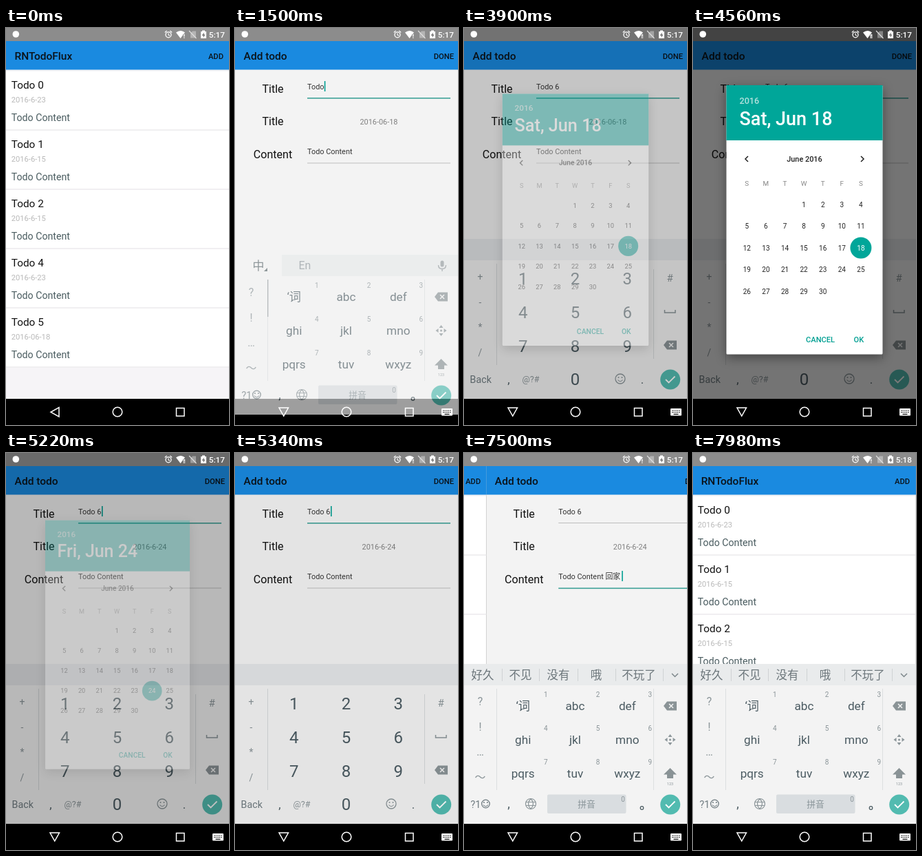
Write an HTML page that moves like this. It is 324 px wide and 576 px high and loops after 8000 ms.

```html
<!DOCTYPE html>
<html lang="en">
<head>
<meta charset="utf-8">
<title>Todo list</title>
<style>
  html, body { margin: 0; width: 324px; height: 576px; overflow: hidden; background: #000; }
  svg { display: block; font-family: Roboto, "Noto Sans CJK SC", "Noto Sans CJK", sans-serif; }
  text { white-space: pre; }
  .mid { text-anchor: middle; }
  .end { text-anchor: end; }
  .bold { font-weight: 500; }
  .line { fill: none; stroke-width: 1.5; }
</style>
</head>
<body>
<svg id="stage" width="324" height="576" viewBox="0 0 324 576"></svg>
<script>
const LOOP = 8000, STEP = 60, WIDTH = 324;
const TEAL = '#009f92', KEY = '#4b5b62', SOFT = '#8b9599', PAPER = '#f3f3f3', BLUE = '#1a8ae0';

const text = (x, y, s, size, fill, cls = '', id = '') =>
  `<text x="${x}" y="${y}" font-size="${size}" fill="${fill}" class="${cls}" id="${id}">${s}</text>`;
const mid = (x, y, s, size, fill, cls = '', id = '') => text(x, y, s, size, fill, 'mid ' + cls, id);
const rect = (x, y, w, h, fill, extra = '') =>
  `<rect x="${x}" y="${y}" width="${w}" height="${h}" fill="${fill}" ${extra}/>`;
const circle = (x, y, r, fill, extra = '') => `<circle cx="${x}" cy="${y}" r="${r}" fill="${fill}" ${extra}/>`;
const ring = (x, y, r, color, width) => circle(x, y, r, 'none', `stroke="${color}" stroke-width="${width}"`);
const path = (d, fill, extra = '') => `<path d="${d}" fill="${fill}" ${extra}/>`;
const line = (d, color, width = 1.5, extra = '') =>
  `<path d="${d}" fill="none" stroke="${color}" stroke-width="${width}" ${extra}/>`;
const group = (id, ...parts) => `<g id="${id}">${parts.join('')}</g>`;
const each = (list, fn) => list.map(fn).join('');

const header = (title, action, right) =>
  rect(0, 19, WIDTH, 41.5, BLUE) +
  text(12.6, 46, title, 15.5, '#0b1218', 'bold') +
  text(right, 45, action, 11.2, '#0b1218', 'bold end');

function listPage() {
  const rows = [['0', '2016-6-23'], ['1', '2016-6-15'], ['2', '2016-6-15'], ['4', '2016-6-23'], ['5', '2016-06-18']];
  return rect(0, 19, WIDTH, 519, '#f6f4f7') +
    rect(0, 61, WIDTH, 430, '#fff') +
    each(rows, ([n, date], i) => {
      const y = 86 * i;
      return text(7.7, y + 88.4, 'Todo ' + n, 15.4, '#111') +
        text(7.7, y + 108, date, 11.2, '#b9b9b9') +
        text(7.7, y + 135, 'Todo Content', 14.2, '#4a5c60') +
        rect(0, y + 147, WIDTH, 2, '#f0eff1');
    }) +
    rect(0, 60, WIDTH, 2.5, '#eeeff3') +
    header('RNTodoFlux', 'ADD', 316);
}

function formPage() {
  const label = (y, s) => mid(55, y, s, 16.1, '#111');
  return rect(0, 19, WIDTH, 519, PAPER) + header('Add todo', 'DONE', 318) +
    label(94, 'Title') + label(141, 'Title') + label(189, 'Content') +
    text(105, 89, 'Todo', 10.9, '#333', '', 'title') +
    mid(209, 140, '2016-06-18', 10.9, '#808080', '', 'date') +
    text(105, 183, 'Todo Content', 10.9, '#333', '', 'content') +
    rect(105, 101, 208, 1, '#bdbdbd', 'id="titleLine"') +
    rect(105, 195.5, 208, 1, '#bdbdbd', 'id="contentLine"') +
    rect(0, 77, 1.6, 15, TEAL, 'id="titleCaret"') +
    rect(0, 171, 1.6, 15, TEAL, 'id="contentCaret"');
}

const backspace = y =>
  path(`M290 ${y}l5 -6.5h14v13h-14z`, '#8a9396') +
  line(`M298 ${y - 3}l6 6m0 -6l-6 6`, PAPER);
const smile = (x, y, r, color) =>
  ring(x, y, r, color, 1.3) + circle(x - 2.5, y - 2, 1, color) + circle(x + 2.5, y - 2, 1, color) +
  line(`M${x - 3.5} ${y + 1.5}q3.5 4.5 7 0`, color, 1.2);
const column = (id, marks, size) =>
  group(id, each(marks, (s, i) => mid(23.5, 366 + 36.5 * i, s, size, SOFT)));

function candidates(id, words, centers, dividers, first, rest) {
  return group(id, rect(0, 306, WIDTH, 31, '#e9ebec'),
    each(words, (w, i) => mid(centers[i], 328, w, 16.5, i ? rest : first)),
    each([...dividers, 289], x => rect(x, 313, 1, 18, '#cfd2d4')),
    line('M302 320l4.5 4.5l4.5 -4.5', '#7d878b'));
}

function pinyinPad() {
  const keys = ['‘词', 'abc', 'def', 'ghi', 'jkl', 'mno', 'pqrs', 'tuv', 'wxyz'];
  const even = [24, 71, 119, 167, 215, 263], evenLines = [47, 95, 143, 191, 239];
  const arrow = a => path('M299.5 408l3 4h-6z', SOFT, `transform="rotate(${a} 299.5 416)"`);
  return group('pinyin',
    rect(0, 0, 76, 49, '#dfe3e5', 'id="press"'),
    group('barStart', rect(68, 306, 256, 31, '#e8eaeb'),
      mid(34, 328, '中', 17, '#59666b'), path('M47 325v5h-5z', '#59666b'),
      text(92.5, 327, 'En', 15.8, SOFT),
      rect(298.5, 314.5, 5, 9, '#939b9e', 'rx="2.5"'),
      line('M295.5 321q0 5.5 5.5 5.5t5.5 -5.5M301 326.5v3.5', '#939b9e', 1.4)),
    candidates('barOne', ['和', '还', '好', '会', '后', '个'], even, evenLines, '#111', '#6b757a'),
    candidates('barTwo', ['回家', '很久', '好久', '回', '和', '还'], even, evenLines, '#111', '#6b757a'),
    candidates('barNext', ['好久', '不见', '没有', '哦', '不玩了'], [27, 82, 137, 192, 254], [55, 109, 165, 220], '#6b757a', '#6b757a'),
    text(7.5, 302, 'h', 12.5, TEAL, '', 'compose'),
    column('marks', ['?', '!', '…', '～'], 16),
    column('letters', ['h', 'g', 'i'], 13),
    rect(47, 342, 1, 147, '#dcdfe0'), rect(275, 342, 1, 147, '#dcdfe0'),
    rect(47, 342, 1.4, 54, '#999fa2', 'id="thumb"'),
    each(keys, (k, i) => {
      const x = 85.7 + 75.8 * (i % 3), y = 49 * Math.floor(i / 3);
      return mid(x, y + 373, k, 17.2, KEY) + mid(x + 33, y + 353.5, i + 1, 10, SOFT);
    }),
    backspace(367),
    group('arrows', each([0, 90, 180, 270], arrow), circle(299.5, 416, 1.5, SOFT)),
    group('clear', mid(299.5, 421, 'Clear', 14, SOFT)),
    path('M299.5 457l9.5 9.5h-5v5.5h-9v-5.5h-5z', '#8a9396'),
    mid(299.5, 482, '123', 5.5, SOFT),
    text(9.5, 515, '?1', 14.5, '#6f7b80'), smile(31.5, 509, 5.8, '#6f7b80'),
    mid(65, 515, ',', 18, KEY),
    ring(97, 509, 7.5, SOFT, 1.2), line('M90 506.5h14M90 511.5h14M97 501.5q-7 7.5 0 15q7 -7.5 0 -15', SOFT, 1.2),
    rect(121, 495.5, 114.5, 27.5, '#d9dde0', 'rx="2"'),
    mid(178, 514, '拼音', 12.8, '#899499'), mid(231, 505.5, '0', 10, SOFT),
    ring(258.5, 515, 2.3, KEY, 1.2));
}

function numberPad() {
  return group('numbers',
    rect(0, 306, WIDTH, 31, '#e4e6e8'),
    rect(199, 387, 75, 48, '#dfe3e5', 'id="pressSix"'),
    column('signs', ['+', '-', '*', '/'], 14),
    rect(47, 342, 1, 147, '#d5d8da'), rect(275, 350, 1, 130, '#d5d8da'),
    each([1, 2, 3, 4, 5, 6, 7, 8, 9], (n, i) =>
      mid(85.7 + 75.8 * (i % 3), 371.5 + 49 * Math.floor(i / 3), n, 24, KEY)),
    mid(161.5, 518, '0', 24, KEY),
    mid(299, 368, '#', 15, SOFT), line('M291.5 409v4h15.5v-4', SOFT), backspace(460),
    text(8.5, 515, 'Back', 14.3, '#6f7b80'), mid(65, 516, ',', 17, KEY),
    mid(97, 513.5, '@?#', 12.6, SOFT), smile(227, 509, 7, SOFT), mid(259, 516, '.', 17, KEY));
}

function keyboard() {
  return group('keyboard', rect(0, 306, WIDTH, 232, PAPER), pinyinPad(), numberPad(),
    circle(299.7, 510, 14.5, '#52bbb0'),
    group('check', line('M293 510l4.5 4.5l9 -9', '#fff', 1.8)),
    group('enter', line('M306.5 506v4h-13m4 -4l-4 4l4 4', '#fff', 1.6)));
}

function dialog() {
  const colX = i => 78.3 + 27.6 * i;
  const day = n => mid(colX((n + 2) % 7), 259.5 + 31.5 * Math.floor((n + 2) / 7), n, 10, '#222', '', 'day' + n);
  return group('dialog',
    rect(48.5, 83, 227, 390.5, '#fff', 'rx="1.5" style="filter:drop-shadow(0 5px 8px rgba(0,0,0,.4))"'),
    rect(48.5, 83, 227, 80, '#00a699'),
    text(67.5, 109.5, '2016', 12.6, '#b3e2de', 'bold'),
    text(67.5, 141, 'Sat, Jun 18', 27, '#fff', 'bold', 'pick'),
    mid(162, 193.5, 'June 2016', 10.9, '#222', 'bold'),
    line('M80 186l-4 4l4 4M244 186l4 4l-4 4', '#222'),
    each([...'SMTWTFS'], (s, i) => mid(colX(i), 229, s, 9.9, '#888')),
    circle(243.9, 319, 15.5, '#00a699', 'id="dot"'),
    each(Array.from({ length: 30 }, (_, i) => i + 1), day),
    text(164, 455.5, 'CANCEL', 11.1, TEAL, 'bold'), text(233.5, 455.5, 'OK', 11.1, TEAL, 'bold'));
}

// Drawn above the dimming layer, so the icons stay white.
function statusIcons() {
  return circle(14.3, 9, 4.8, '#fff') +
    ring(236, 9.8, 4, '#fff', 1.3) +
    line('M236 7.5v2.5l2 1.2M230.8 6.5l2.8 -2.5M241.2 6.5l-2.8 -2.5', '#fff', 1.1) +
    path('M247 6.5q6.5 -5 13 0l-6.5 8.5z', '#fff') +
    rect(257, 9, 4, 6, '#8c8c8c') + rect(258.2, 9, 1.3, 3.5, '#fff') + rect(258.2, 13.5, 1.3, 1.3, '#fff') +
    path('M268 8l3 -3.5h5v10h-8z', '#fff', 'opacity=".35"') + line('M266 4l10.5 11', '#e0e0e0', 1.1) +
    path('M283 5h2v-1.5h4v1.5h2v10h-8z', '#fff') + path('M287.6 6.5l-3 4.5h2v3l3 -4.5h-2z', '#777') +
    text(318, 13.5, '5:17', 11.8, '#fff', 'bold end', 'clock');
}

const stage = document.getElementById('stage');
stage.innerHTML =
  group('list', listPage()) + group('form', formPage()) +
  rect(0, 0, WIDTH, 19, '#8c8c8c') + rect(0, 538, WIDTH, 38, '#000') + keyboard() +
  group('backLeft', line('M77 550.5v13.5l-12 -6.75z', '#fff')) +
  group('backDown', line('M64 551h13.5l-6.75 12z', '#fff'),
    rect(300, 552, 16, 10.5, '#fff', 'rx="1"'),
    line('M302 555h12M302 557.5h12', '#000', 1.2, 'stroke-dasharray="1.5 1"'),
    line('M304.5 560.3h7', '#000', 1.2)) +
  ring(162, 557, 6.8, '#fff', 1.5) +
  line('M247.5 551.5h11.5v11.5h-11.5z', '#fff') +
  rect(0, 0, WIDTH, 538, '#000', 'id="dim"') + statusIcons() + dialog();

const ui = {};
stage.querySelectorAll('[id]').forEach(e => { if (e.id) ui[e.id] = e; });

const show = (name, on) => ui[name].style.display = on ? '' : 'none';
const set = (name, attr, value) => ui[name].setAttribute(attr, value);
const move = (name, x, y = 0) => set(name, 'transform', `translate(${x} ${y})`);
const clamp = v => Math.min(1, Math.max(0, v));
const within = (t, a, b) => t >= a && t < b;

// Overdamped spring: share of the way still to go, ms after release.
function rest(ms) {
  if (ms <= 0) return 1;
  const s = ms / 1000, slow = 12.1, fast = 66.9;
  return (fast * Math.exp(-slow * s) - slow * Math.exp(-fast * s)) / (fast - slow);
}

function caret(name, t, spans) {
  const hit = spans.find(([a, b]) => within(t, a, b));
  show(name, hit);
  if (hit) set(name, 'x', hit[2]);
}

function underline(name, on) {
  set(name, 'fill', on ? '#3fa298' : '#bdbdbd');
  set(name, 'height', on ? 1.6 : 1);
}

function pages(t) {
  const shift = t < 4000 ? 1 - rest(t - 560) : rest(t - 7480);
  const x = Math.abs(shift - Math.round(shift)) < .002 ? Math.round(shift) * WIDTH : shift * WIDTH;
  move('list', -x);
  move('form', WIDTH - x);
  ui.clock.textContent = t < 7740 ? '5:17' : '5:18';
}

function fields(t) {
  ui.title.textContent = t < 3300 ? 'Todo' : 'Todo 6';
  ui.date.textContent = t < 5100 ? '2016-06-18' : '2016-6-24';
  ui.content.textContent = t < 7080 ? 'Todo Content' : 'Todo Content 回家';
  underline('titleLine', within(t, 1380, 5640));
  underline('contentLine', t >= 5640);
  caret('titleCaret', t, [[1380, 1860, 129.8], [2100, 2580, 132.8], [3060, 3300, 132.8], [3300, 3900, 139], [5100, 5640, 139]]);
  caret('contentCaret', t, [[5640, 6120, 171.5], [6240, 7080, 174], [7080, LOOP, 197]]);
}

function keys(t) {
  const open = clamp((t - 1360) / 280), left = 1 - open;
  show('keyboard', t >= 1380);
  show('backLeft', t < 1380);
  show('backDown', t >= 1380);
  move('keyboard', 0, Math.round(92 * left * left));
  ui.keyboard.style.opacity = clamp(open * 1.3);

  const numeric = within(t, 2880, 5700), composing = within(t, 6420, 7080);
  show('numbers', numeric);
  show('pinyin', !numeric);
  show('thumb', t < 2880);
  show('pressSix', within(t, 3300, 3360));
  show('barStart', t < 6420);
  show('barOne', within(t, 6420, 6540));
  show('barTwo', within(t, 6540, 7080));
  show('barNext', t >= 7080);
  show('compose', composing);
  ui.compose.textContent = t < 6540 ? 'h' : 'hj';
  show('letters', composing);
  show('marks', !composing);
  show('clear', composing);
  show('arrows', !composing);
  show('enter', composing);
  show('check', !composing);

  const presses = [
    [2040, 2160, 115, 491, 126, 37], [2820, 2880, 2, 491, 46, 37], [6180, 6300, 115, 491, 126, 37],
    [6360, 6480, 48, 391, 75, 49], [6480, 6660, 123, 391, 76, 49]
  ];
  const hit = presses.find(([a, b]) => within(t, a, b));
  show('press', hit);
  if (hit) ['x', 'y', 'width', 'height'].forEach((k, i) => set('press', k, hit[i + 2]));
}

function picker(t) {
  const opening = clamp((t - 3840) / 300), closing = clamp((t - 5040) / 340);
  const level = 1 - (1 - opening) ** 2;
  ui.dim.style.opacity = .52 * level * (1 - closing);
  const alpha = level * (1 - clamp((t - 5040) / 240));
  show('dialog', alpha > 0);
  ui.dialog.style.opacity = alpha;
  const size = .9 + .1 * alpha;
  set('dialog', 'transform', `translate(162 278) scale(${size}) translate(-162 -278)`);

  const late = t >= 4620;
  ui.pick.textContent = late ? 'Fri, Jun 24' : 'Sat, Jun 18';
  set('dot', 'cx', late ? 216.3 : 243.9);
  set('dot', 'cy', late ? 350.5 : 319);
  set('day18', 'fill', late ? '#222' : '#fff');
  set('day24', 'fill', late ? '#fff' : '#222');
}

const start = performance.now();
function frame() {
  const now = (performance.now() - start) % LOOP;
  const t = Math.floor(now / STEP) * STEP;
  pages(t);
  fields(t);
  keys(t);
  picker(t);
  requestAnimationFrame(frame);
}
frame();
</script>
</body>
</html>
```
